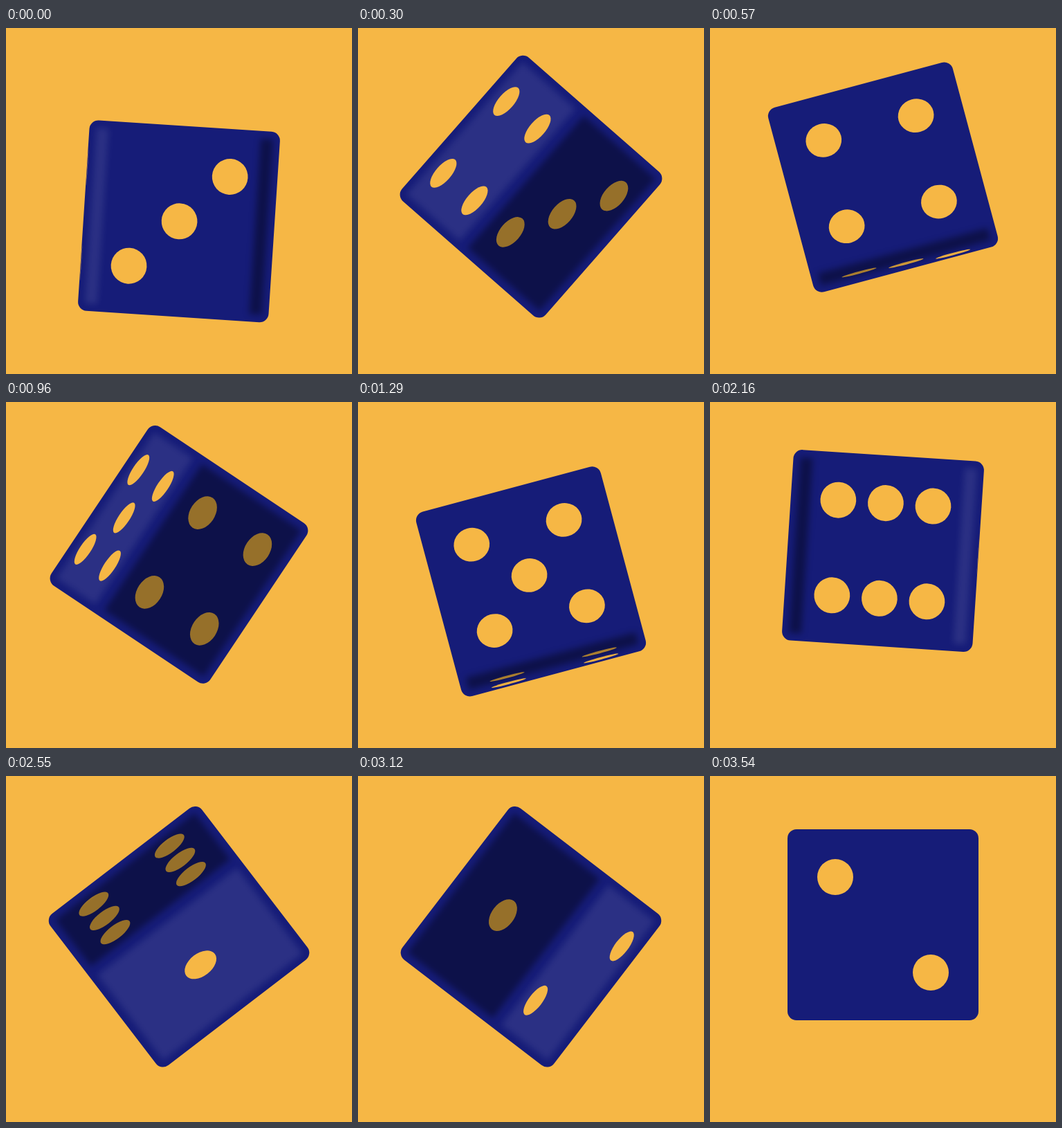
Animation of 500x500 px, one loop 3570 ms. Source, as an HTML page with a canvas:

```html
<!DOCTYPE html>
<html lang="en">
<head>
<meta charset="utf-8">
<title>Rolling die</title>
<style>
  html, body { margin: 0; width: 100%; height: 100%; overflow: hidden; background: #f6b745; }
  canvas { display: block; width: 100vw; height: 100vh; }
</style>
</head>
<body>
<canvas id="stage" width="500" height="500"></canvas>
<script>
const ctx = document.getElementById('stage').getContext('2d');

const STEP = 30, STEPS = 119, ROLL = 24;
const SIZE = 276, HALF = SIZE / 2, CORNER = 13;
const GAP = 69, DOT = 26;
const GOLD = '#f6b745', NAVY = '#161c78';

// Dot positions in units of GAP, for a face lying square
const corners = [[-1, -1], [1, -1], [-1, 1], [1, 1]];
const FACES = [
  [[1, -1], [0, 0], [-1, 1]],
  corners,
  [...corners, [0, 0]],
  [...corners, [0, -1], [0, 1]],
  [[0, 0]],
  [[-1, -1], [1, 1]]
];

function drawDots(dots, x, scale) {
  ctx.fillStyle = GOLD;
  for (const [dx, dy] of dots) {
    ctx.beginPath();
    ctx.ellipse(x + dx * GAP * scale, dy * GAP, DOT * scale, DOT, 0, 0, Math.PI * 2);
    ctx.fill();
  }
}

// Soft band reaching inward from one side of the die
function drawShade(side, reach, color, alpha) {
  if (alpha <= 0) return;
  const width = reach - 18;
  const left = side > 0 ? HALF - 10 - width : 10 - HALF;
  ctx.save();
  ctx.globalAlpha = alpha;
  ctx.filter = 'blur(5px)';
  ctx.fillStyle = color;
  ctx.fillRect(left, 11 - HALF, width, SIZE - 22);
  ctx.restore();
}

function draw(step) {
  const pos = step + (step < 95 ? 1 : 2);
  const roll = Math.floor(pos / ROLL);
  const phase = pos % ROLL;
  const angle = phase / ROLL * Math.PI / 2;
  const entering = Math.sin(angle) ** 2;
  const leaving = 1 - entering;
  const side = roll < 2 ? 1 : -1;
  const fall = Math.abs(ROLL - pos % (2 * ROLL)) / ROLL;

  ctx.fillStyle = GOLD;
  ctx.fillRect(0, 0, 500, 500);

  ctx.save();
  ctx.translate(250, 215 + 72 * fall ** 2.65);
  ctx.rotate(angle);
  ctx.beginPath();
  ctx.roundRect(-HALF, -HALF, SIZE, SIZE, CORNER);
  ctx.fillStyle = NAVY;
  ctx.fill();
  ctx.clip();

  const lightReach = Math.max(36, entering * SIZE);
  const lightFade = Math.min(1, phase, Math.max(0, (20 - phase) / 5));
  drawShade(-side, lightReach, '#fff', 0.09 * lightFade);

  const next = FACES[(roll + 1) % 6].map(([x, y]) => [y, -x]);
  drawDots(FACES[roll % 6], side * HALF * entering, leaving);
  drawDots(next, -side * HALF * leaving, entering);

  const darkReach = Math.max(36, Math.min(leaving, phase / 8) * SIZE);
  const darkFade = Math.min(1, phase, (ROLL - phase) / 3);
  drawShade(side, darkReach, '#000', 0.39 * darkFade);
  ctx.restore();
}

let start;
function tick(now) {
  start ??= now;
  draw(Math.floor((now - start) / STEP + 0.001) % STEPS);
  requestAnimationFrame(tick);
}
draw(0);
requestAnimationFrame(tick);
</script>
</body>
</html>
```
